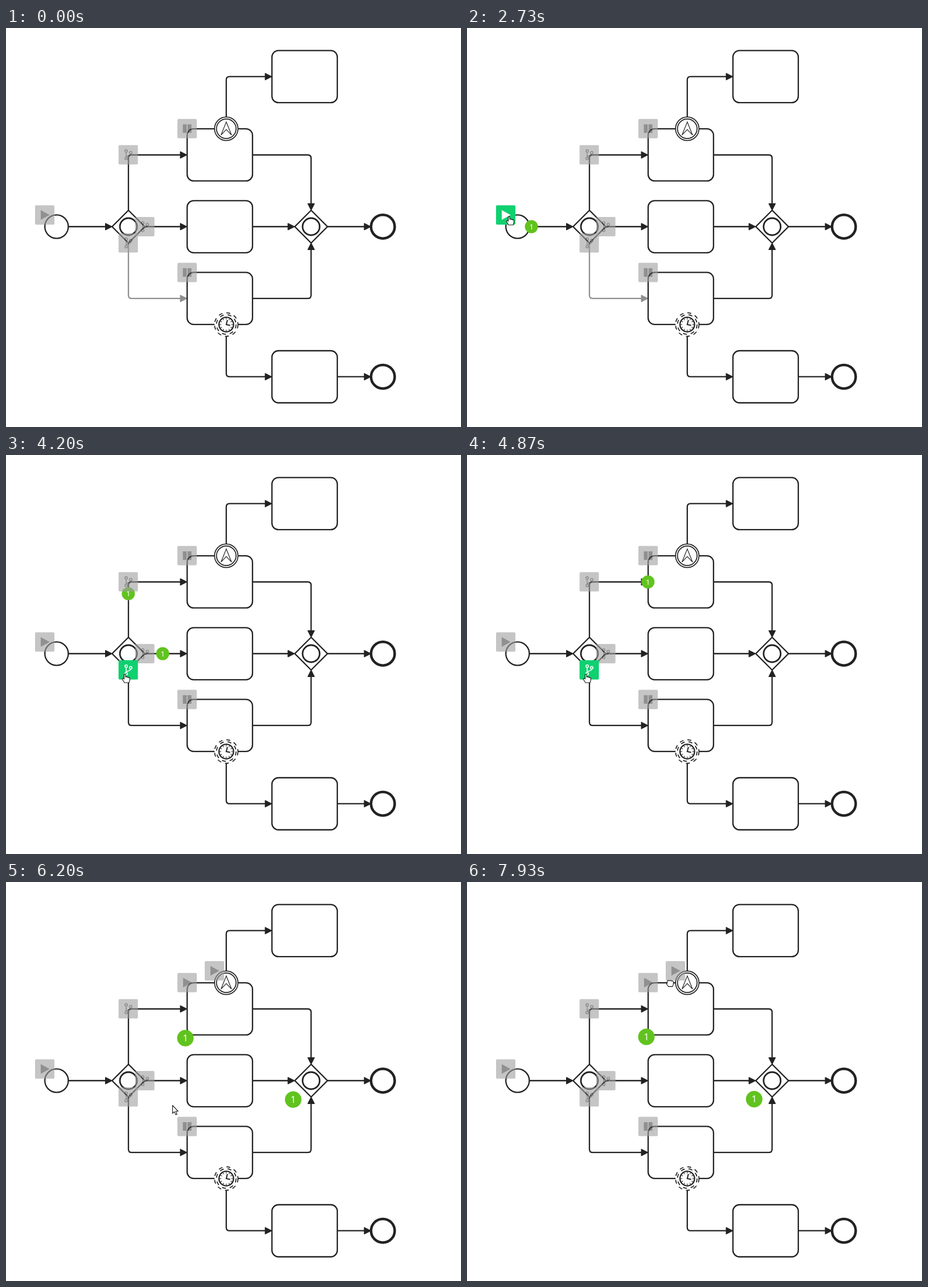
An HTML page for the animation above (8 s loop, 799x701 px).

```html
<!DOCTYPE html>
<html lang="en">
<head>
<meta charset="utf-8">
<title>Process flow</title>
<style>
  html, body { margin: 0; width: 100%; height: 100%; overflow: hidden; background: #fff; }
  svg { display: block; width: 799px; height: 701px; }
  text { font-family: "Noto Sans", "Open Sans", sans-serif; fill: #fff; text-anchor: middle; }
  .line { fill: none; stroke: #222; stroke-width: 2.3; }
  .shape { fill: #fff; stroke: #222; stroke-width: 2.3; }
  .thin { fill: #fff; stroke: #222; stroke-width: 1.7; }
  .token { fill: #61c31e; }
  .button { opacity: .6; color: #474747; }
  .button rect { fill: #a0a0a0; }
  .button.hover { opacity: 1; color: #fff; }
  .button.hover rect { fill: #10d070; }
  .solid { fill: currentColor; }
  .stroke { fill: none; stroke: currentColor; stroke-width: 1.6; }
  .cursor { fill: #fff; stroke: #111; stroke-width: 1.1; stroke-linejoin: round; }
</style>
</head>
<body>
<svg id="stage" viewBox="0 0 799 701"></svg>
<script>
const LOOP = 8000;
const stage = document.getElementById('stage');

// Static diagram
const task = (x, y) =>
  `<rect class="shape" x="${x}" y="${y}" width="114.8" height="91.5" rx="11.4"/>`;
const circle = (x, y, r, width = 2.3, cls = 'shape', extra = '') =>
  `<circle class="${cls}" cx="${x}" cy="${y}" r="${r}" style="stroke-width:${width}" ${extra}/>`;
const gateway = x =>
  `<path class="shape" d="M${x} 320.3l28.7 28.7-28.7 28.7-28.7-28.7z"/>` + circle(x, 349, 15, 2.8);

function flow(d, x, y, angle = 0, id = '') {
  return `<g ${id && `id="${id}"`}><path class="line" d="${d}"/>
    <path d="M0 0l-12-6v12z" fill="#222" stroke="#222" stroke-width="1" stroke-linejoin="round"
      transform="translate(${x} ${y}) rotate(${angle})"/></g>`;
}

const ticks = Array.from({ length: 12 }, (_, i) =>
  `<path class="line" style="stroke-width:1.1" d="M0-11.5v2.6" transform="translate(386.8 521) rotate(${i * 30})"/>`).join('');

const diagram = [
  flow('M109.5 349H180', 186.5, 349),
  flow('M215 320V228.7q0-5.7 5.7-5.7H312', 318, 223),
  flow('M244 349H312', 318, 349),
  flow('M215 378V469.5q0 5.7 5.7 5.7H312', 318, 475.2, 0, 'lowerFlow'),
  flow('M433 223H530q5.7 0 5.7 5.7V314', 535.8, 320.5, 90),
  flow('M433 349H501', 507, 349),
  flow('M433 475.2H530q5.7 0 5.7-5.7V384', 535.8, 377.5, -90),
  flow('M564.5 349H635', 641, 349),
  flow('M386.8 156V91.1q0-5.7 5.7-5.7H461', 467, 85.4),
  flow('M386.8 542V607q0 5.7 5.7 5.7H461', 467, 612.7),
  flow('M582 612.7H635', 641, 612.7),
  task(318.1, 177.2), task(318.1, 303.3), task(318.1, 429.4), task(467, 39.7), task(467, 567),
  gateway(215), gateway(535.8),
  circle(88.8, 349, 20.6), circle(661.8, 349, 20.8, 4.5), circle(661.8, 612.7, 20.8, 4.5),
  circle(386.8, 177, 20.6, 1.7), circle(386.8, 177, 17.2, 1.7),
  '<path class="thin" style="stroke-width:1.2" d="M386.8 165l9.3 23.2-9.3-9.8-9.3 9.8z"/>',
  circle(386.8, 521, 20.6, 1.7, 'thin', 'stroke-dasharray="6.9"'),
  circle(386.8, 521, 17.2, 1.7, 'thin', 'stroke-dasharray="6.9"'),
  circle(386.8, 521, 12.8, 2.3), ticks,
  '<path class="line" style="stroke-width:2" d="M388.8 513l-2 8 6.8 1.4"/>'
].join('');

// Overlay buttons
const icons = {
  play: '<path class="solid" d="M-7-8.5L8.5 0-7 8.5z"/>',
  pause: '<path class="solid" d="M-7.5-7.5h6.8v15h-6.8zM.8-7.5h6.8v15H.8z"/>',
  fork: `<g class="stroke"><circle cx="-3.6" cy="-6.6" r="2.2"/><circle cx="-3.6" cy="6.6" r="2.2"/>
    <circle cx="4.4" cy="-3.8" r="2.2"/><path d="M-3.6-4.4V4.4M4.4-1.6C4.4 2.6-3.2 .8-3.6 4.4"/></g>`
};
const button = (id, x, y, icon) =>
  `<g id="${id}" class="button" transform="translate(${x} ${y})">
    <rect x="-17" y="-17" width="34" height="34" rx="2"/>${icons[icon]}</g>`;

const buttons = [
  button('start', 68, 328.5, 'play'),
  button('forkUp', 214.6, 222.7, 'fork'),
  button('forkRight', 243.7, 349, 'fork'),
  button('forkDown', 214.6, 377.6, 'fork'),
  button('pauseUp', 318, 176.8, 'pause'),
  button('playUp', 318, 176.8, 'play'),
  button('pauseDown', 318, 429.4, 'pause'),
  button('boundary', 366, 156, 'play')
].join('');

// Tokens ride along a line; badges wait at an element
const token = (id, r, size) =>
  `<g id="${id}"><circle class="token" r="${r}"/><text y="${size * .36}" font-size="${size}">1</text></g>`;

const rides = [
  { id: 'ride0', from: 2590, span: 1090, path: [[110, 349], [186, 349]] },
  { id: 'ride1', from: 3690, span: 1206, path: [[214.8, 320], [214.8, 223], [318, 223]] },
  { id: 'ride2', from: 3690, span: 1138, path: [[244, 349], [318, 349]] },
  { id: 'ride3', from: 4985, span: 1054, path: [[433, 349], [507, 349]] }
];
const badges = [
  { id: 'badge0', from: 4960, x: 315, y: 272 },
  { id: 'badge1', from: 6040, x: 504.3, y: 381 }
];

const cursors = `
  <path id="arrow" class="cursor" d="M.5.5V14.6L3.7 11.6 6 16.9 8.3 15.9 6 10.8H10.4Z"/>
  <path id="hand" class="cursor" d="M-1.6 8.6V1.3C-1.6-.3 1-.3 1 1.3V5.2C1.3 4 3.4 4.2 3.6 5.6
    C4 4.7 5.9 4.9 6.1 6.3C6.7 5.5 8.4 5.9 8.4 7.4V10.4C8.4 12 7.4 12.6 7.2 15H-1.2
    C-1.4 12.8-4.6 10.6-4.8 8.8C-4.9 7-2.7 7.2-1.6 8.6Z"/>
  <path id="grab" class="cursor" d="M1.6 6V2.4C1.6.7 3.9.6 4.3 1.8C4.7.3 6.9.5 7.2 1.8
    C7.7.6 9.7.9 9.9 2.3C10.6 1.4 12.4 1.8 12.4 3.4V7.2C12.4 9 11.3 9.6 11 11.6H3.4
    C3.2 9.8.6 8.8.5 7C.5 5.6 1.1 5.6 1.6 6Z"/>`;

stage.innerHTML = diagram + rides.map(r => token(r.id, 11.5, 13)).join('') + buttons +
  badges.map(b => token(b.id, 14.5, 16)).join('') + cursors;

const el = Object.fromEntries([...stage.querySelectorAll('[id]')].map(n => [n.id, n]));

// time, x, y, cursor shown from that time on
const pointer = [
  [800, 8, 342, 'arrow'],
  [1200, 52, 332, 'hand'],
  [1270, 57, 331, 'hand'],
  [1500, 74, 331, 'hand'],
  [2870, 74, 331, 'hand'],
  [2970, 88, 336, 'arrow'],
  [3270, 188, 369, 'arrow'],
  [3370, 203, 380, 'hand'],
  [3560, 209, 385, 'hand'],
  [4950, 209, 385, 'hand'],
  [5050, 196, 398, 'arrow'],
  [5140, 177, 404, 'arrow'],
  [5460, 287, 395, 'arrow'],
  [5560, 287, 395, 'arrow'],
  [5860, 292, 392, 'arrow'],
  [7060, 292, 392, 'arrow'],
  [7420, 326, 266, 'grab'],
  [7600, 341, 198, 'grab'],
  [7860, 350, 172, 'grab'],
  [LOOP, 350, 172, 'grab']
];

const ease = p => (1 - Math.cos(Math.PI * p)) / 2;
const between = (t, from, to) => t >= from && t < to;
const show = (node, on) => node.style.display = on ? '' : 'none';
const place = (node, x, y) => node.setAttribute('transform', `translate(${x} ${y})`);

function pointAlong(path, progress) {
  const lengths = path.slice(1).map(([x, y], i) => Math.hypot(x - path[i][0], y - path[i][1]));
  let left = progress * lengths.reduce((a, b) => a + b);
  let i = 0;
  while (i < lengths.length - 1 && left > lengths[i]) left -= lengths[i++];
  const k = left / lengths[i], [x, y] = path[i], [nx, ny] = path[i + 1];
  return [x + (nx - x) * k, y + (ny - y) * k];
}

function drawPointer(t) {
  const next = pointer.findIndex(step => step[0] > t);
  const [from, x, y, kind] = pointer[Math.max(0, next - 1)];
  for (const id of ['arrow', 'hand', 'grab']) show(el[id], next > 0 && id === kind);
  if (next < 1) return;
  const [to, nx, ny] = pointer[next];
  const k = (t - from) / (to - from);
  place(el[kind], x + (nx - x) * k, y + (ny - y) * k);
}

function draw(t) {
  for (const { id, from, span, path } of rides) {
    const on = between(t, from, from + span);
    show(el[id], on);
    if (on) place(el[id], ...pointAlong(path, ease((t - from) / span)));
  }
  for (const { id, from, x, y } of badges) {
    show(el[id], t >= from);
    place(el[id], x, y + 5 * ease((t - from) / 500));
  }
  const waiting = t >= badges[0].from;
  show(el.playUp, waiting);
  show(el.boundary, waiting);
  show(el.pauseUp, !waiting);
  el.start.classList.toggle('hover', between(t, 1335, 2970));
  el.forkDown.classList.toggle('hover', between(t, 3400, 5050));
  el.lowerFlow.setAttribute('opacity', t < 4195 ? .5 : 1);
  drawPointer(t);
}

const began = performance.now();
function tick() {
  draw((performance.now() - began) % LOOP);
  requestAnimationFrame(tick);
}
tick();
</script>
</body>
</html>
```
